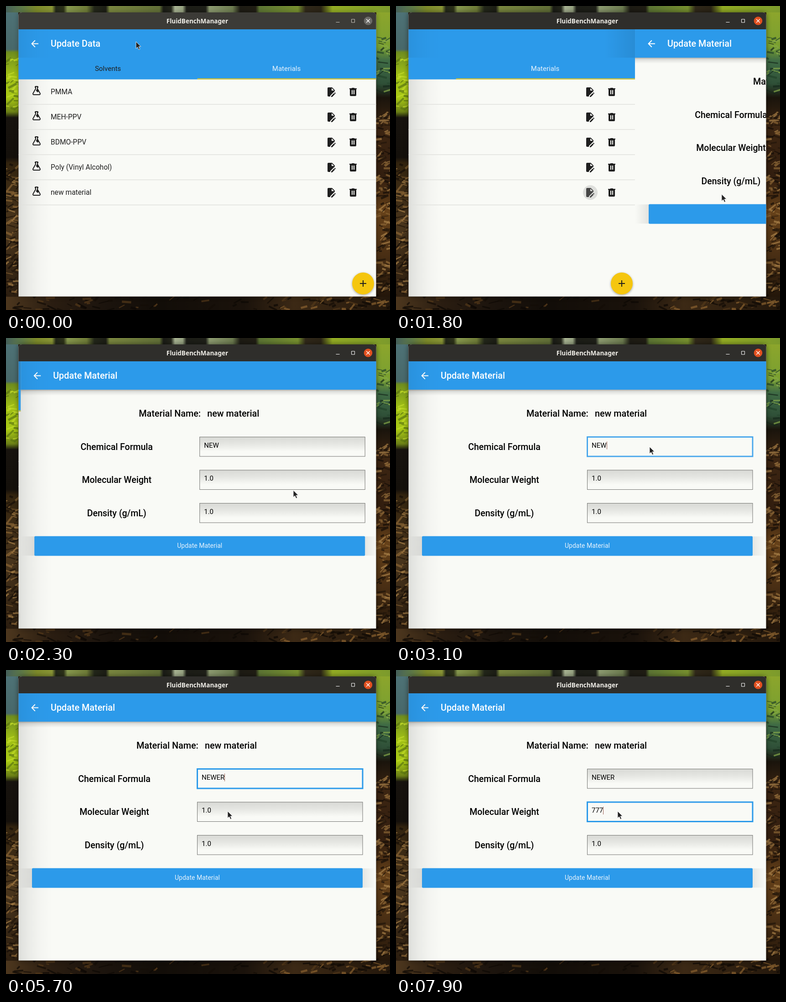
An HTML page for the animation above (8000 ms loop, 842x665 px).

```html
<!DOCTYPE html>
<html lang="en">
<head>
<meta charset="utf-8">
<title>Update Material</title>
<style>
html, body { margin: 0; width: 100%; height: 100%; overflow: hidden; }
body {
  background:
    linear-gradient(90deg, #45605a 0, #5d7848 4%, #7d8a2a 8%, #8a9636 12%, #23281a 13%, #2c3018 15%, #87984e 16%,
      #6f7c38 21%, #23271a 23%, #1c1d15 26%, #79863f 27%, #626f38 40%, #1a1b16 41%, #23251a 43%, #a7b292 44%,
      #98a482 46%, #1c1d17 47%, #1e1f18 52%, #8c9a70 53%, #6d7c50 59%, #1d1b14 61%, #201d14 65%, #5c7434 66%,
      #77902f 76%, #30281a 78%, #2b2416 82%, #93ac24 85%, #7c9a2c 100%) 0 0/842px 14px no-repeat,
    linear-gradient(90deg, #4d371e, #2a1d11 12%, #1c140d 25%, #120d08 40%, #1a120b 62%, #3c2915 75%, #24180c)
      0 636px/842px 29px no-repeat,
    linear-gradient(#4e7276, #48686a 13%, #6f8d1e 14%, #a0bf16 22%, #a8c815 30%, #6b8016 35%, #17130e 37%, #14100b 51%,
      #33240f 53%, #4a361d 75%, #2c1e10) 0 14px/27px 622px no-repeat,
    linear-gradient(#8ca52c, #7aa030 12%, #3f6b45 17%, #2f5038 25%, #1a140c 30%, #3c2512 40%, #321e0f 58%,
      #664119 70%, #4a2f14 85%, #23160a) 812px 14px/30px 622px no-repeat, #2a1c10;
}
svg { display: block; }
text { font-family: Roboto, sans-serif; }
.head { font-weight: 500; font-size: 19.8px; }
.label { font-weight: 500; font-size: 19.5px; }
.mid { text-anchor: middle; }
.row { font-size: 15.6px; fill: #1f1f1f; }
.input { font-size: 15px; white-space: pre; }
</style>
</head>
<body>
<svg id="stage" width="842" height="665" viewBox="0 0 842 665"></svg>
<script>
const BLUE = '#2c9aea', PAPER = '#f9faf6', INK = '#1f1f1f';
const LOOP = 8000, PAGE = 785;

const icons = {
  flask: 'M6 22A3 3 0 0 1 3.5 17.4L9 7.8V6A1 1 0 0 1 8 5V4A2 2 0 0 1 10 2H14A2 2 0 0 1 16 4V5A1 1 0 0 1 15 6V7.8L20.5 17.4A3 3 0 0 1 18 22ZM5 19A1 1 0 0 0 6 20H18A1 1 0 0 0 18.8 18.4L16.3 14 14.3 16 10.4 12 11.7 10.7 11 8.35 5.2 18.4ZM11 4V8.4L12 10 13 8.4V4Z',
  edit: 'M6 2A2 2 0 0 0 4 4V20A2 2 0 0 0 6 22H10V20.1L20 10.1V8L14 2ZM13 3.5L18.5 9H13ZM20.1 13L18.7 14.2 20.8 16.3 21.8 15.3V14.5L20.5 13.2ZM18.1 14.8L12 20.9V23H14.1L20.2 16.9Z',
  trash: 'M9 3V4H4V6H5V19A2 2 0 0 0 7 21H17A2 2 0 0 0 19 19V6H20V4H15V3ZM9 8H11V17H9ZM13 8H15V17H13Z',
  back: 'M20 11V13H8L13.5 18.5 12.1 19.9 4.2 12 12.1 4.1 13.5 5.5 8 11Z',
  plus: 'M19 13H13V19H11V13H5V11H11V5H13V11H19Z'
};
const icon = (name, x, y, fill = INK) =>
  `<path d="${icons[name]}" transform="translate(${x} ${y})" fill="${fill}" fill-rule="evenodd"/>`;
const text = (label, x, y, cls, fill = '#000', extra = '') =>
  `<text x="${x}" y="${y}" class="${cls}" fill="${fill}" ${extra}>${label}</text>`;
const rect = (x, y, w, h, fill, extra = '') =>
  `<rect x="${x}" y="${y}" width="${w}" height="${h}" fill="${fill}" ${extra}/>`;
const gradient = (id, vertical, stops) =>
  `<linearGradient id="${id}" x2="${vertical ? 0 : 1}" y2="${vertical ? 1 : 0}">` +
  stops.map(([offset, color, opacity = 1]) =>
    `<stop offset="${offset}" stop-color="${color}" stop-opacity="${opacity}"/>`).join('') + '</linearGradient>';

// Twigs and leaves on the blurred forest floor around the window.
let seed = 7;
const random = () => (seed = seed * 16807 % 2147483647) / 2147483647;
function streaks(count, x, y, w, h, colors) {
  let out = '';
  for (let i = 0; i < count; i++) {
    const angle = random() * 1.4 - 0.9, length = 6 + random() * 16;
    out += `<path d="M${x + random() * w} ${y + random() * h}l${length * Math.cos(angle)} ${length * Math.sin(angle)}"
      stroke="${colors[i % colors.length]}" stroke-width="${1.5 + random() * 3.5}" opacity=".7"/>`;
  }
  return out;
}
const bark = ['#8a6536', '#22160b', '#a98149', '#150e08'];
const forest = '<g style="filter:blur(.6px)">' +
  streaks(110, -8, 345, 32, 290, bark) + streaks(150, 808, 240, 34, 390, bark) +
  streaks(90, -5, 638, 850, 28, ['#54391b', '#140d07', '#0e0905']) +
  streaks(20, 600, 638, 240, 28, ['#8a6230']) +
  streaks(30, -6, 110, 30, 120, ['#c3dc2a', '#5b7512']) +
  streaks(35, 810, 55, 32, 140, ['#23432a', '#86a94a', '#16291c']) + '</g>';

const names = ['PMMA', 'MEH-PPV', 'BDMO-PPV', 'Poly (Vinyl Alcohol)', 'new material'];
const listPage = rect(27, 51, PAGE, 109.5, BLUE) + icon('back', 51, 70.5, '#fff') +
  text('Update Data', 98, 89, 'head', '#fff') +
  text('Solvents', 223.5, 142, 'mid', INK, 'font-size="15"') +
  text('Materials', 615, 142, 'mid', '#e6f2fc', 'font-size="15"') +
  rect(419.5, 158.5, 392.5, 2, '#f0c814') +
  names.map((name, i) => {
    const y = 161 + 55 * i;
    return icon('flask', 55, y + 12) + text(name, 98, y + 32, 'row') +
      icon('edit', 701, y + 15) + icon('trash', 749, y + 15) + rect(27, y + 53.5, PAGE, 1.5, '#e1e2de');
  }).join('') +
  '<circle id="ripple" cx="714" cy="408" fill="#a0a09e" opacity=".3"/>' +
  '<circle cx="783" cy="608.5" r="24" fill="#000" opacity=".35" style="filter:blur(2.5px)"/>' +
  '<circle cx="783" cy="607" r="24" fill="#f5c60f"/>' + icon('plus', 771, 595);

const labels = ['Chemical Formula', 'Molecular Weight', 'Density (g/mL)'];
const fieldTop = i => 216.5 + 72.5 * i;
const formPage = rect(-40, 51, 67, 62, 'url(#sideIn)') +
  rect(27, 113, PAGE, 13, 'url(#barShadow)') + rect(27, 51, PAGE, 62, BLUE) +
  icon('back', 51, 70.5, '#fff') + text('Update Material', 98, 89, 'head', '#fff') +
  text('Material Name:', 286, 171.5, 'head') + text('new material', 436, 171.5, 'head') +
  labels.map((label, i) => {
    const y = fieldTop(i);
    return text(label, 237.5, y + 28, 'label mid') +
      rect(419.5, y, 362.5, 42.5, 'url(#well)', `id="box${i}" stroke-width="1"`) +
      text('', 429, y + 23, 'input', '#000', `id="value${i}"`) +
      rect(0, y + 10, 1, 17, '#9a5f50', `id="caret${i}"`) +
      `<rect id="ring${i}" fill="none" stroke="${BLUE}" stroke-width="3"/>`;
  }).join('') +
  rect(27, 434, 30, 42, 'url(#sideIn)') + rect(782, 434, 28, 42, 'url(#sideOut)') +
  rect(57, 433.5, 725, 43, BLUE, 'rx="2"') +
  text('Update Material', 419.5, 459, 'mid', '#e6f2fc', 'font-size="14"');

const frame = 'M27.5 635.5V22Q27.5 14 35 14H804Q811.5 14 811.5 22V635.5Z';
document.getElementById('stage').innerHTML = '<defs>' +
  gradient('well', true, [[0, '#d8d9d5'], [0.35, '#e5e6e2'], [0.75, PAPER], [1, PAPER]]) +
  gradient('edge', false, [[0, '#000', 0.11], [0.3, '#000', 0.06], [0.65, '#000', 0.02], [1, '#000', 0]]) +
  gradient('barShadow', true, [[0, '#000', 0.3], [0.3, '#000', 0.11], [1, '#000', 0]]) +
  gradient('sideIn', false, [[0, '#000', 0], [1, '#000', 0.09]]) +
  gradient('sideOut', false, [[0, '#000', 0.08], [1, '#000', 0]]) +
  `<clipPath id="window"><path d="${frame}"/></clipPath></defs>` + forest +
  `<path id="shade" d="${frame}" style="filter:blur(6px)"/>
  <g clip-path="url(#window)">` +
    rect(27, 14, PAGE, 622, PAPER) + rect(27, 51, 75, 585, 'url(#edge)') +
    `<g id="list">${listPage}</g><g id="form">${formPage}</g>` +
    rect(27, 51, 75, 62, 'url(#edge)', 'opacity=".5"') +
    rect(27, 14, PAGE, 37, '#3c3b37', 'id="titleBar"') +
    text('FluidBenchManager', 419.5, 38, 'mid', '#f0eee8',
      'style="font:700 13.5px \'Noto Sans\',sans-serif"') +
    `<g fill="none" stroke="#dfdbd2" id="controls"><path d="M723.5 35.5H731.5M757.5 29H764.5V36H757.5Z"/></g>
    <circle id="close" cx="794" cy="32.5" r="9.3"/>
    <path d="M790.2 28.7l7.6 7.6m0-7.6l-7.6 7.6" stroke="#fff" stroke-width="1.3"/>
  </g>
  <path id="mouse" d="M0 0V15L3.5 11.8 6 17.5 8.6 16.4 6.1 10.8H10.8Z" fill="#222" stroke="#fff" stroke-width=".8"/>`;

const part = id => document.getElementById(id);
const set = (id, attributes) => {
  for (const key in attributes) part(id).setAttribute(key, attributes[key]);
};
const clamp = v => Math.max(0, Math.min(1, v));

// Latest value whose start time has passed.
const valueAt = (steps, t) => steps.reduce((value, [start, next]) => t >= start ? next : value, steps[0][1]);

const mousePath = [[0, 285, 78], [300, 285, 78], [400, 363, 180], [500, 363, 180], [900, 659, 409],
  [1000, 659, 409], [1200, 728, 425], [1400, 714, 411], [2000, 714, 412], [2400, 602, 307],
  [2700, 556, 238], [3100, 556, 238], [3300, 495, 299], [5500, 495, 299], [5700, 486, 309], [LOOP, 486, 309]];
function mouseAt(t) {
  const i = mousePath.findIndex(key => key[0] > t);
  const [t0, x0, y0] = mousePath[i - 1], [t1, x1, y1] = mousePath[i];
  const p = (t - t0) / (t1 - t0);
  return [x0 + (x1 - x0) * p, y0 + (y1 - y0) * p];
}

const fields = [
  { focus: 2810, blur: 5753, values: [[0, 'NEW'], [4500, 'NEWE'], [4600, 'NEWER']],
    caret: [[0, 1], [3300, 0], [3800, 1], [4300, 0], [4500, 1], [5100, 0], [5600, 1]] },
  { focus: 5753, blur: LOOP, values: [[0, '1.0'], [6600, '1.'], [6700, '1'], [6800, ''], [7600, '7'], [7800, '77'], [7900, '777']],
    caret: [[0, 1], [6200, 0], [6600, 1], [7300, 0], [7600, 1]] },
  { focus: LOOP, blur: LOOP, values: [[0, '1.0']], caret: [[0, 0]] }
];

function drawField(field, i, t) {
  const focused = t >= field.focus && t < field.blur;
  const age = t - field.focus;
  const value = part('value' + i);
  value.textContent = valueAt(field.values, t);
  set('box' + i, { fill: focused ? PAPER : 'url(#well)', stroke: focused ? BLUE : '#747572' });
  set('caret' + i, {
    x: Math.round(429 + value.getComputedTextLength()),
    opacity: focused ? valueAt(field.caret, t) : 0
  });
  // The focus outline closes in on the field while it fades in.
  const gap = 60 * (1 - clamp(age / 300)) ** 3;
  set('ring' + i, {
    x: 419.5 - gap, y: fieldTop(i) - gap, width: 362.5 + 2 * gap, height: 42.5 + 2 * gap,
    opacity: focused ? clamp(age / 400) : 0
  });
}

function draw(now) {
  const t = Math.floor(now % LOOP / 100) * 100;
  const active = t >= 1600;
  const slide = 1 - (1 - clamp((t - 1657) / 700)) ** 2;
  set('list', { transform: `translate(${-PAGE * slide})` });
  set('form', { transform: `translate(${PAGE * (1 - slide)})`, visibility: slide > 0 ? 'visible' : 'hidden' });
  set('ripple', { r: active ? 6 + 15 * clamp((t - 1600) / 300) : 0 });
  set('titleBar', { fill: active ? '#2f2e2b' : '#3c3b37' });
  set('controls', { stroke: active ? '#fff' : '#c9c6bf' });
  set('close', { fill: active ? '#e2501f' : '#6c6b67' });
  set('shade', { opacity: active ? 0.5 : 0.3 });
  fields.forEach((field, i) => drawField(field, i, t));
  set('mouse', { transform: `translate(${mouseAt(t)})` });
  requestAnimationFrame(() => draw(performance.now() - start));
}
const start = performance.now();
draw(0);
</script>
</body>
</html>
```
